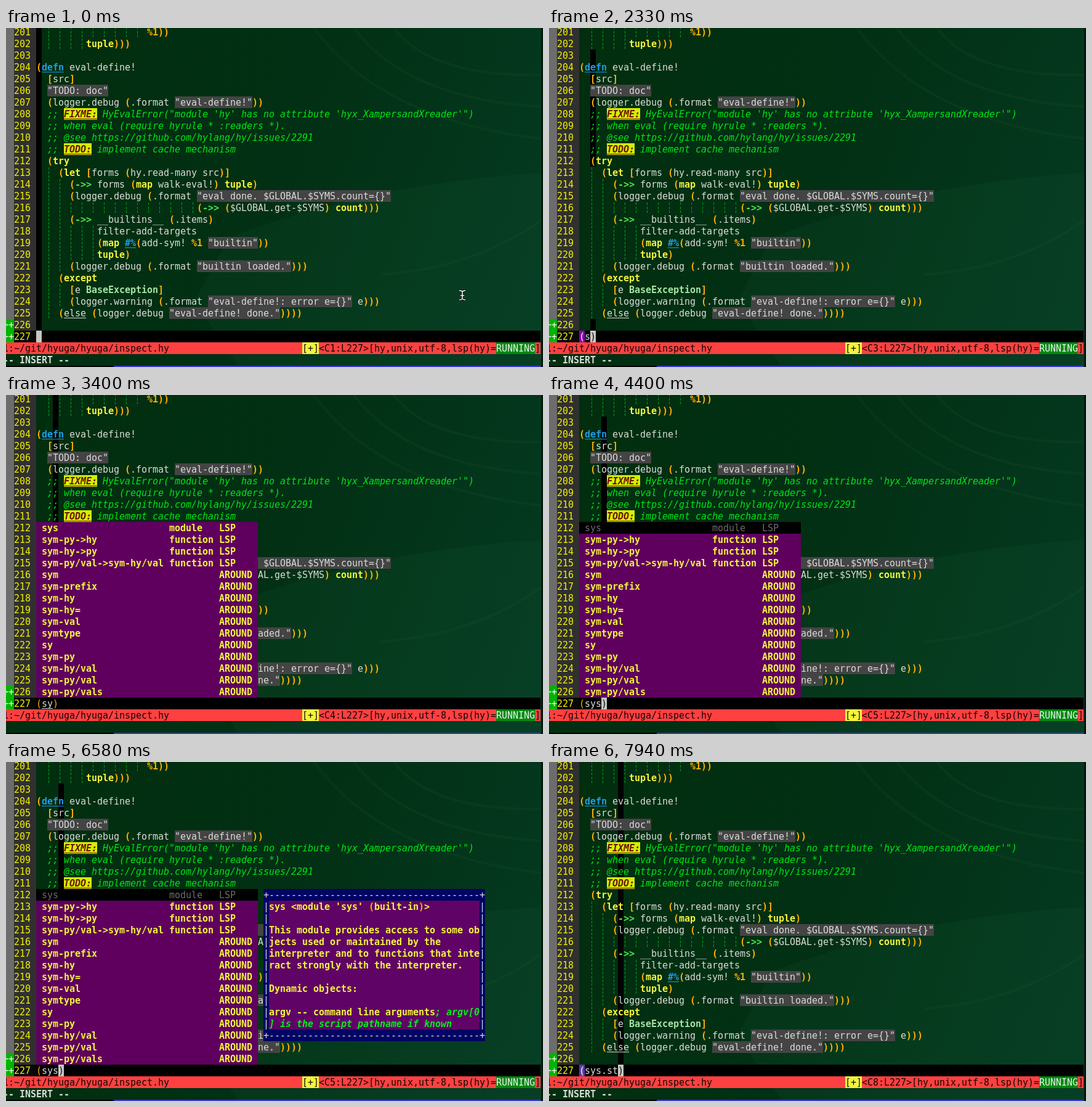
Recreate the animation shown at these times as an HTML page with a canvas. Size 872 px wide and 550 px high, loop 8000 ms.

```html
<!DOCTYPE html>
<html lang="en">
<head>
<meta charset="utf-8">
<title>Completion in a terminal editor</title>
<style>
html, body { margin: 0; width: 100%; height: 100%; overflow: hidden; background: #02300f; }
canvas { display: block; }
</style>
</head>
<body>
<canvas id="stage" width="872" height="550"></canvas>
<script>
const ctx = document.getElementById('stage').getContext('2d');
const CW = 9, RH = 19, LEFT = 49, LOOP = 8000;
const FAMILY = '15px "DejaVu Sans Mono", "Liberation Mono", monospace';
const FG = '#d8ddd8', YELLOW = '#f4f43c', ORANGE = '#ffaf00', GREEN = '#00e414', PURPLE = '#5f005f';

const colX = c => LEFT + c * CW;
const rowY = n => 491 + (n - 227) * RH;

function fill(x, y, w, h, color) {
  ctx.fillStyle = color;
  ctx.fillRect(x, y, w, h);
}

// One run of text on the character grid; returns the column after it.
function put(col, row, str, s = {}) {
  const x = colX(col), y = rowY(row), w = str.length * CW;
  if (s.bg) fill(x, y, w, RH, s.bg);
  ctx.font = (s.italic ? 'italic ' : '') + (s.bold ? 'bold ' : '') + FAMILY;
  ctx.fillStyle = s.color || FG;
  [...str].forEach((ch, i) => { if (ch !== ' ') ctx.fillText(ch, x + i * CW, y + 15); });
  if (s.line) ctx.fillRect(x, y + 17, w, 1);
  return col + str.length;
}

const bold = color => ({ color, bold: true });
const STRING = { bg: '#444444' };
const BRACKET = bold(ORANGE);
const COMMENT = { color: GREEN, italic: true };
const TAG = { color: '#6c1400', bg: '#d4f000', bold: true, italic: true, line: true };
const BLUE = { color: '#1e9be8', bold: true, line: true };
const STYLES = {
  'defn': BLUE, '#%': BLUE, '->>': bold('#4ce44c'), '%1': bold(ORANGE),
  'BaseException': bold('#a4e4a4'), 'else': { line: true }
};
for (const word of ['try', 'let', 'map', 'tuple', 'except', 'count']) STYLES[word] = bold(YELLOW);

function styleOf(token) {
  if (token[0] === '"') return STRING;
  if (/^[()[\]]/.test(token)) return BRACKET;
  return Object.hasOwn(STYLES, token) ? STYLES[token] : {};
}

function code(col, row, str) {
  if (str.startsWith(';;')) {
    for (const part of str.split(/(FIXME:|TODO:)/)) {
      col = put(col, row, part, /^(FIXME|TODO):$/.test(part) ? TAG : COMMENT);
    }
    return;
  }
  for (const token of str.match(/"[^"]*"|[()[\]]+|\s+|[^\s()[\]"]+/g) || []) {
    col = put(col, row, token, styleOf(token));
  }
}

// Start column and text of each line from 201 on
const SOURCE = [
  [20, '%1))'],
  [9, 'tuple)))'],
  [0, ''],
  [0, '(defn eval-define!'],
  [2, '[src]'],
  [2, '"TODO: doc"'],
  [2, '(logger.debug (.format "eval-define!"))'],
  [2, `;; FIXME: HyEvalError("module 'hy' has no attribute 'hyx_XampersandXreader'")`],
  [2, ';; when eval (require hyrule * :readers *).'],
  [2, ';; @see https://github.com/hylang/hy/issues/2291'],
  [2, ';; TODO: implement cache mechanism'],
  [2, '(try'],
  [4, '(let [forms (hy.read-many src)]'],
  [6, '(->> forms (map walk-eval!) tuple)'],
  [6, '(logger.debug (.format "eval done. $GLOBAL.$SYMS.count={}"'],
  [29, '(->> ($GLOBAL.get-$SYMS) count)))'],
  [6, '(->> __builtins__ (.items)'],
  [11, 'filter-add-targets'],
  [11, '(map #%(add-sym! %1 "builtin"))'],
  [11, 'tuple)'],
  [6, '(logger.debug (.format "builtin loaded.")))'],
  [4, '(except'],
  [6, '[e BaseException]'],
  [6, '(logger.warning (.format "eval-define!: error e={}" e)))'],
  [4, '(else (logger.debug "eval-define! done."))))'],
  [0, '']
];

const ITEMS = [
  ['sys', 'module', 'LSP'],
  ...['sym-py->hy', 'sym-hy->py', 'sym-py/val->sym-hy/val'].map(n => [n, 'function', 'LSP']),
  ...['sym', 'sym-prefix', 'sym-hy', 'sym-hy=', 'sym-val', 'symtype', 'sy', 'sym-py',
    'sym-hy/val', 'sym-py/val', 'sym-py/vals'].map(n => [n, '', 'AROUND'])
];

const DOC = [
  "sys <module 'sys' (built-in)>", '',
  'This module provides access to some ob',
  'jects used or maintained by the',
  'interpreter and to functions that inte',
  'ract strongly with the interpreter.', '',
  'Dynamic objects:', '',
  'argv -- command line arguments; argv[0',
  '] is the script pathname if known'
];

// Each step changes part of the editor state.
const STEPS = [
  [0, { text: '', cur: 0, on: true, match: '', menu: false, picked: false, doc: false, insert: true, mouse: true, spell: false }],
  [330, { on: false }],
  [800, { on: true }],
  [1130, { text: '()', cur: 1, mouse: false }],
  [1200, { match: '#8700af' }],
  [2330, { text: '(s)', cur: 2 }],
  [2600, { text: '(sy)', cur: 3 }],
  [2670, { spell: true }],
  [2800, { menu: true, match: '' }],
  [2870, { insert: false }],
  [3400, { on: false }],
  [3790, { on: true }],
  [4320, { text: '(sys)', cur: 4, picked: true, spell: false }],
  [4460, { insert: true }],
  [4530, { doc: true }],
  [5310, { on: false }],
  [5780, { on: true }],
  [6310, { on: false }],
  [6580, { on: true }],
  [6650, { text: '(sys.)', cur: 5, menu: false, doc: false, match: '#5f3aa8' }],
  [7330, { on: false }],
  [7650, { on: true }],
  [7720, { text: '(sys.s)', cur: 6 }],
  [7870, { text: '(sys.st)', cur: 7 }]
];

const stateAt = t => Object.assign({}, ...STEPS.filter(s => s[0] <= t).map(s => s[1]));

function backdrop() {
  const g = ctx.createLinearGradient(0, 120, 872, 430);
  g.addColorStop(0, '#012e0e');
  g.addColorStop(0.5, '#023014');
  g.addColorStop(1, '#043a21');
  fill(0, 0, 872, 550, g);

  ctx.fillStyle = 'rgba(30,110,75,0.1)';
  ctx.fill(new Path2D('M362 340 L306 443 L378 550 H872 V235 Q600 250 362 340 Z'));

  ctx.strokeStyle = 'rgba(50,110,50,0.1)';
  ctx.lineWidth = 4;
  for (let i = 0; i < 3; i++) {
    ctx.beginPath();
    ctx.moveTo(500 + i * 65, 0);
    ctx.quadraticCurveTo(610 + i * 40, 150 - i * 35, 872, 180 - i * 52);
    ctx.stroke();
  }
  ctx.beginPath();
  ctx.moveTo(610, 400);
  ctx.quadraticCurveTo(760, 390, 872, 310);
  ctx.stroke();
}

const isGuide = (c, end) => c >= 2 && c < end && c % 2 === 0;

function guides(row, end) {
  for (let c = 2; c < end; c += 2) {
    for (const dy of [1, 8, 14]) fill(colX(c) + 2, rowY(row) + dy, 1, 4, '#00a020');
  }
}

function gutter() {
  fill(0, 0, 13, 510, '#6c6c6c');
  fill(13, 0, 36, 491, '#303030');
  fill(13, 491, 36, RH, '#080808');
  for (let n = 201; n <= 227; n++) {
    if (n > 225) put(-6, n, '++', { color: '#ffffff', bg: '#00b400' });
    put(-4, n, String(n), { color: '#f0f000' });
  }
}

function buffer(s) {
  fill(LEFT, 491, 868 - LEFT, RH, '#000');
  SOURCE.forEach(([col, str], i) => {
    const row = 201 + i;
    // Indent guides keep their own background over the cursor column.
    if (!isGuide(s.cur, col)) fill(colX(s.cur), rowY(row), CW, RH, '#000');
    guides(row, col);
    code(col, row, str);
  });
}

function typedLine(s) {
  [...s.text].forEach((ch, i) => {
    const style = /[()]/.test(ch) ? { color: ORANGE } : { line: s.spell };
    if (i === 0 && s.match) Object.assign(style, { bg: s.match, color: '#ffffff' });
    put(i, 227, ch, style);
  });
  if (s.on) put(s.cur, 227, s.text[s.cur] || ' ', { bg: '#c4c8c4', color: '#101010' });
}

function menu(s) {
  fill(LEFT, rowY(212), 40 * CW, ITEMS.length * RH, PURPLE);
  ITEMS.forEach(([name, kind, origin], i) => {
    const chosen = s.picked && i === 0;
    const style = chosen ? { color: '#6c6c6c' } : bold(YELLOW);
    if (chosen) fill(LEFT, rowY(212), 40 * CW, RH, '#000');
    put(1, 212 + i, name, style);
    put(24, 212 + i, kind, style);
    put(33, 212 + i, origin, style);
  });
}

function docWindow() {
  const edge = '+' + '-'.repeat(38) + '+';
  fill(colX(41), rowY(212), 40 * CW, 13 * RH, '#000464');
  fill(colX(42), rowY(213), 38 * CW, 11 * RH, '#5f0466');
  put(41, 212, edge);
  put(41, 224, edge);
  let comment = false;
  DOC.forEach((str, i) => {
    const row = 213 + i;
    put(41, row, '|');
    put(80, row, '|');
    let col = 42;
    for (const part of str.split(/([();])/)) {
      if (part === ';') comment = true;
      const style = comment ? { color: '#00f01c', bold: true, italic: true }
        : /^[()]$/.test(part) ? BRACKET : bold(YELLOW);
      col = put(col, row, part, style);
    }
  });
}

function statusBar(s) {
  const ink = { color: '#100404' };
  fill(0, 510, 868, RH, '#ff4040');
  put(-6, 228, '1:~/git/hyuga/hyuga/inspect.hy', ink);
  let col = put(48, 228, '[+]', { color: '#101010', bg: '#f4f43c' });
  col = put(col, 228, `<C${s.cur + 1}:L227>[hy,unix,utf-8,lsp(hy)=`, ink);
  col = put(col, 228, 'RUNNING', { color: '#f0f0f0', bg: '#008a10' });
  put(col, 228, ']', ink);
  if (s.insert) put(-6, 229, '-- INSERT --', bold(FG));
  fill(0, 548, 175, 2, '#000');
  fill(175, 548, 693, 2, '#3838d0');
  fill(869, 0, 3, 550, '#03180f');
}

function pointer() {
  const beam = new Path2D('M736 426 Q740 426 741 428 Q742 426 746 426 M741 428 V439 M736 441 Q740 441 741 439 Q742 441 746 441 M738 434 H744');
  for (const [color, width] of [['#101010', 3.5], ['#f0f0f0', 1.6]]) {
    ctx.strokeStyle = color;
    ctx.lineWidth = width;
    ctx.stroke(beam);
  }
}

function draw(t) {
  const s = stateAt(t);
  backdrop();
  buffer(s);
  gutter();
  typedLine(s);
  if (s.menu) menu(s);
  if (s.doc) docWindow();
  statusBar(s);
  if (s.mouse) pointer();
}

const start = performance.now();
function tick() {
  draw((performance.now() - start) % LOOP);
  requestAnimationFrame(tick);
}
tick();
</script>
</body>
</html>
```
